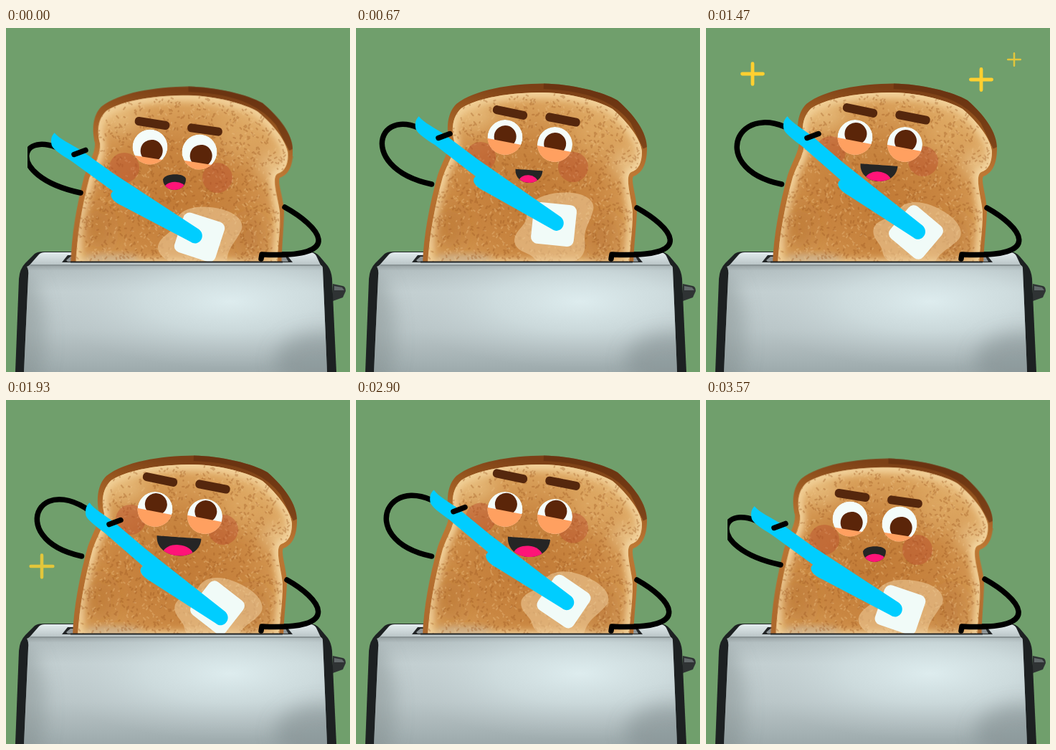
Write an HTML page that moves like this. It is 480 px wide and 480 px high and loops after 3610 ms.

```html
<!DOCTYPE html>
<html lang="en">
<head>
<meta charset="utf-8">
<title>Buttering toast</title>
<style>
html, body { margin: 0; width: 100%; height: 100%; overflow: hidden; background: #709f6c; }
svg { display: block; width: 100vw; height: 100vh; }
.limb { fill: none; stroke: #000; stroke-width: 7.5; stroke-linecap: round; stroke-linejoin: round; }
</style>
</head>
<body>
<svg viewBox="0 0 480 480" xmlns="http://www.w3.org/2000/svg">
  <defs>
    <linearGradient id="crust" x1="0.35" y1="0" x2="0.2" y2="1">
      <stop offset="0" stop-color="#7c4016"/><stop offset=".14" stop-color="#97561f"/>
      <stop offset=".4" stop-color="#bd7834"/><stop offset="1" stop-color="#ac682c"/>
    </linearGradient>
    <radialGradient id="crumb" cx=".47" cy=".6" r=".62">
      <stop offset="0" stop-color="#c17a36"/><stop offset=".5" stop-color="#c98641"/>
      <stop offset=".85" stop-color="#d9a05a"/><stop offset="1" stop-color="#e6b877"/>
    </radialGradient>
    <linearGradient id="steel" x1="0" y1="0" x2="0" y2="1">
      <stop offset="0" stop-color="#98a2a4"/><stop offset=".05" stop-color="#b4c0c2"/>
      <stop offset=".25" stop-color="#c3cfd1"/><stop offset=".6" stop-color="#bac6c8"/>
      <stop offset="1" stop-color="#9daaac"/>
    </linearGradient>
    <radialGradient id="shine" cx=".68" cy=".32" r=".62" gradientTransform="translate(0 .02)">
      <stop offset="0" stop-color="#dfeef0" stop-opacity=".95"/><stop offset=".45" stop-color="#d6e5e7" stop-opacity=".6"/>
      <stop offset="1" stop-color="#c0cccf" stop-opacity="0"/>
    </radialGradient>
    <linearGradient id="lid" x1="0" y1="0" x2="0" y2="1">
      <stop offset="0" stop-color="#e3ecee"/><stop offset="1" stop-color="#b4bfc1"/>
    </linearGradient>
    <filter id="soft" x="-30%" y="-30%" width="160%" height="160%"><feGaussianBlur stdDeviation="5"/></filter>
    <filter id="softer" x="-60%" y="-60%" width="220%" height="220%"><feGaussianBlur stdDeviation="13"/></filter>
    <clipPath id="above"><rect width="480" height="326"/></clipPath>
    <clipPath id="armBox"><rect x="30" width="450" height="480"/></clipPath>
    <clipPath id="eyeBall"><circle r="24.5"/></clipPath>
    <path id="loaf" d="M93 330C94 290 103 245 114 205C121 185 130 172 130 158C126 140 127 119 140 106C165 86 215 78 262 77.500C300 78 345 89 365 101C388 121 406 145 406 168C406 192 398 203 387 207C383 212 392 238 392 255C391 280 388 300 387 330Z"/>
    <path id="slice" d="M100 330C102 290 110 248 121 208C127 190 138 175 137 158C133 142 134 124 147 112C170 97 215 90 262 90C300 91 340 102 358 113C380 132 397 155 399 172C399 188 394 198 384 201C374 206 385 240 386 256C386 285 382 305 381 330Z"/>
    <path id="panel" d="M33 331H438Q442 331 442 336L448 480H25L31 346Q32 337 29 333Z"/>
    <clipPath id="inLoaf"><use href="#loaf"/></clipPath>
    <clipPath id="inSlice"><use href="#slice"/></clipPath>
    <clipPath id="inPanel"><use href="#panel"/></clipPath>
    <clipPath id="inMouth"><path id="mouthClip"/></clipPath>
  </defs>

  <rect width="480" height="480" fill="#709f6c"/>

  <g id="toaster">
    <path d="M456 357L470 360Q474 361 474 367L470 376L456 381Z" fill="#2f3334"/>
    <path d="M458 360L469 362L472 366H458Z" fill="#62696b"/>
    <path d="M13 480L18 350Q19 336 27 328L40 315Q44 312 52 312H424Q432 312 438 319L449 332Q454 339 455 350L461 480Z" fill="#1d2122"/>
    <path d="M31 333L45 317Q48 313 54 313H424Q430 313 433 318L440 333Z" fill="url(#lid)"/>
    <use href="#panel" fill="url(#steel)"/>
    <use href="#panel" fill="url(#shine)"/>
    <g clip-path="url(#inPanel)" filter="url(#softer)">
      <ellipse cx="24" cy="430" rx="30" ry="90" fill="#7e898b" opacity=".45"/>
      <ellipse cx="440" cy="465" rx="65" ry="40" fill="#7e898b" opacity=".5"/>
    </g>
    <path d="M34 331H438" stroke="#8a9496" stroke-width="2"/>
    <path d="M78 327L86 317H392L400 327Z" fill="#232627"/>
    <path d="M84 324L90 319H96V326H86Z" fill="#8d9496"/>
    <path d="M384 319H390L394 326H384Z" fill="#8d9496"/>
  </g>

  <g clip-path="url(#above)">
    <g id="toast">
      <use href="#loaf" fill="url(#crust)"/>
      <path clip-path="url(#inLoaf)" d="M262 77C340 80 372 104 390 128L408 165" fill="none" stroke="#5d2a0d" stroke-width="16" opacity=".55"/>
      <use href="#slice" fill="url(#crumb)"/>
      <g clip-path="url(#inSlice)">
        <use href="#slice" fill="none" stroke="#f3d39c" stroke-width="14" filter="url(#soft)"/>
        <g filter="url(#softer)">
          <ellipse cx="165" cy="122" rx="28" ry="18" fill="#efcb90" opacity=".6"/>
          <ellipse cx="330" cy="150" rx="30" ry="30" fill="#e4b16c" opacity=".5"/>
          <ellipse cx="378" cy="190" rx="16" ry="14" fill="#f6dba8" opacity=".9"/>
          <ellipse cx="130" cy="280" rx="18" ry="35" fill="#b0682a" opacity=".5"/>
          <ellipse cx="345" cy="295" rx="22" ry="35" fill="#b0682a" opacity=".45"/>
        </g>
        <ellipse cx="150" cy="322" rx="40" ry="7" fill="#c9b294" opacity=".7" filter="url(#soft)"/>
        <path id="dark" fill="none" stroke="#9c5520" stroke-width="2.2" stroke-linecap="round" opacity=".33"/>
        <path id="light" fill="none" stroke="#efc488" stroke-width="2" stroke-linecap="round" opacity=".33"/>
      </g>
    </g>
    <g fill="#b8402c" fill-opacity=".36"><circle id="cheekL" r="21"/><circle id="cheekR" r="21"/></g>
    <path id="spread" fill="#f1cf9f" fill-opacity=".55" d="M-32 -30C-22 -42 0 -48 26 -46C46 -44 58 -34 55 -22C50 -4 42 4 43 20C46 38 38 50 18 51C-4 48 -16 58 -27 46C-34 36 -52 38 -55 22C-55 6 -40 2 -38 -12C-38 -20 -36 -26 -32 -30Z"/>
    <g id="eyes"></g>
    <g fill="#55270d"><rect id="browL" x="-24.5" y="-6" width="49" height="12" rx="5.5"/><rect id="browR" x="-24.5" y="-6" width="49" height="12" rx="5.5"/></g>
    <g id="mouth">
      <path id="lips" fill="#252525"/>
      <ellipse id="tongue" fill="#ff1478" clip-path="url(#inMouth)"/>
    </g>
    <rect id="butter" x="-30" y="-29" width="60" height="58" rx="9" fill="#f1fbf8"/>
  </g>
  <path d="M90 326.500H386" stroke="#202324" stroke-width="2"/>

  <g clip-path="url(#armBox)"><path id="armL" class="limb"/></g>
  <path id="knife" fill="#00cdff" d="M0 -1C12 2 26 -2 46 -3L100 -3.500L242 -10.500C257 -10 257 10.500 243 10.500L136 26C121 29 112 25 114 17L42 17C26 18.500 14 19 8 16C2 11 -1 6 0 -1Z"/>
  <path id="grip" class="limb" d="M-8 3L8 -3"/>
  <path id="armR" class="limb"/>
  <g id="stars" fill="none" stroke="#ffd030" stroke-linecap="round"></g>
</svg>
<script>
const LOOP = 3610;
const $ = id => document.getElementById(id);
const put = (id, x, y, rot = 0) => $(id).setAttribute("transform", `translate(${x} ${y}) rotate(${rot})`);
const set = (el, attrs) => { for (const k in attrs) el.setAttribute(k, attrs[k]); };

// Smooth periodic curve through the given values, without overshoot
function track(times, values) {
  const n = times.length;
  const at = i => times[(i + n) % n] + LOOP * Math.floor(i / n);
  const val = i => values[(i + n) % n];
  const slope = i => (val(i + 1) - val(i)) / (at(i + 1) - at(i));
  const tangent = i => {
    const a = slope(i - 1), b = slope(i);
    return a * b <= 0 ? 0 : 2 * a * b / (a + b);
  };
  return t => {
    let i = n - 1;
    while (times[i] > t) i--;
    const h = at(i + 1) - at(i), p = (t - at(i)) / h, q = 1 - p;
    return val(i) * q * q * (1 + 2 * p) + val(i + 1) * p * p * (3 - 2 * p)
      + h * p * q * (q * tangent(i) - p * tangent(i + 1));
  };
}
function tracks(times, table) {
  const out = {};
  for (const k in table) out[k] = track(times, table[k]);
  return out;
}
function sample(table, t) {
  const out = {};
  for (const k in table) out[k] = table[k](t);
  return out;
}

const tool = tracks([0, 670, 1470, 1930, 2230, 2530, 2880, 3230, 3400, 3570], {
  x: [67, 87, 113, 116, 80, 75, 108, 104, 84, 67],
  y: [147, 124, 124, 144, 154, 132, 126, 149, 158, 149],
  rot: [36, 37.6, 41.2, 41, 37.5, 36.3, 40, 40.2, 38, 36],
  bx: [270, 276, 293, 295, 272, 269, 290, 288, 276, 271],
  by: [292, 274, 285, 290, 296, 287, 281, 291, 299, 293],
  brot: [18, 6, 40, 38, 24, 22, 34, 36, 26, 19],
  ax: [20, 34, 50, 50, 30, 28, 48, 45, 28, 20],
  ay: [130, 91, 85, 82, 110, 110, 86, 87, 125, 131]
});
const face = tracks([0, 670, 1470, 1930, 2530, 3230, 3570], {
  brow: [133, 118, 115, 111, 106, 107, 133],
  cheek: [195, 180, 172, 167, 164, 166, 195],
  lid: [15, 6, 5, 3, 1, 4, 15],
  gaze: [5, -1, -5, -7, -8, -6, 5],
  mouthY: [211, 198, 191, 191.5, 192, 194, 211],
  mouthW: [32, 38, 52, 62, 61, 56, 32],
  mouthD: [15, 18, 23, 26, 27, 25, 15],
  elbow: [480, 482, 478, 475, 473, 482, 480]
});
const lean = track([0, 560, 2800, 3230, 3570], [0, 1, 1, 0.93, 0]);

// Crumb texture
let seed = 7;
const rnd = () => (seed = seed * 16807 % 2147483647) / 2147483647;
function crumbs(n) {
  let d = "";
  while (n--) d += `M${(100 + rnd() * 300).toFixed(1)} ${(92 + rnd() * 236).toFixed(1)}l${(rnd() * 5 - 2.5).toFixed(1)} ${(rnd() * 3).toFixed(1)}`;
  return d;
}
$("dark").setAttribute("d", crumbs(1100));
$("light").setAttribute("d", crumbs(800));

$("eyes").innerHTML = ["L", "R"].map(s =>
  `<g id="eye${s}"><g clip-path="url(#eyeBall)"><circle r="24.500" fill="#f4fcfa"/>` +
  `<circle id="pupil${s}" r="15.500" fill="#5b2509"/>` +
  `<rect id="lid${s}" x="-30" width="60" height="60" fill="#ffa060"/></g></g>`).join("");

const stars = [
  { x: 65, y: 64, r: 19, from: 850, to: 1700 },
  { x: 384, y: 72, r: 19, from: 1000, to: 1650 },
  { x: 430, y: 44, r: 13, from: 1350, to: 1850, thin: 0.55 },
  { x: 50, y: 232, r: 19, from: 1650, to: 2060, thin: 0.9 }
];
for (const s of stars) {
  s.el = document.createElementNS("http://www.w3.org/2000/svg", "path");
  $("stars").append(s.el);
}

function drawFace(t, L) {
  const f = sample(face, t), back = 1 - L;
  const tilt = 9 + 2 * L;
  put("eyeL", 201 + 7 * L, 166 - 13.5 * L, tilt);
  put("eyeR", 270 + 7.5 * L, 173 - 10.5 * L, tilt);
  for (const s of ["L", "R"]) {
    set($("pupil" + s), { cx: 3 * back, cy: f.gaze });
    set($("lid" + s), { y: f.lid });
  }
  const bx = 204 + 11 * L;
  put("browL", bx, f.brow, 9 + 3 * L);
  put("browR", bx + 73.5, f.brow + 9 + L, 8 + 3 * L);
  put("cheekL", 165 + 9 * L, f.cheek);
  put("cheekR", 295 + 8 * L, f.cheek + 14);

  const w = f.mouthW / 2, d = f.mouthD, bulge = 9 * back;
  const shape = `M${-w} 0C${-w * 0.9} ${-bulge} ${w * 0.9} ${-bulge} ${w} 0C${w} ${d * 1.33} ${-w} ${d * 1.33} ${-w} 0Z`;
  $("lips").setAttribute("d", shape);
  $("mouthClip").setAttribute("d", shape);
  set($("tongue"), { cx: 0, cy: d * 0.95, rx: w * (0.7 + 0.3 * back), ry: d * (0.54 + 0.16 * back) });
  put("mouth", 235 + 6.5 * L, f.mouthY, -2 + 6 * L);
  return f.elbow;
}

function drawArms(t, L, elbow) {
  const p = sample(tool, t);
  put("knife", p.x, p.y, p.rot);
  put("grip", p.x + 36, p.y + 26.5);
  put("butter", p.bx, p.by, p.brot);
  put("spread", p.bx, p.by + 2, (p.brot - 6) * 0.9);
  const sx = 104 + 1.5 * L, sy = 230 - 12 * L;
  $("armL").setAttribute("d", `M${sx} ${sy}C${sx - 112} ${sy - 24} ${p.ax} ${p.ay} ${p.x + 24} ${p.y + 31}`);
  const rx = 389 + 3 * L, ry = 250 + L;
  $("armR").setAttribute("d", `M${rx} ${ry}C${rx + 45} ${ry + 25} ${elbow} 322 357 316L356 322`);
}

function drawStars(t) {
  for (const s of stars) {
    const p = (t - s.from) / (s.to - s.from);
    const env = p > 0 && p < 1 ? Math.sqrt(Math.sin(Math.PI * p)) : 0;
    const r = Math.max(0, s.r * env - 2);
    set(s.el, {
      d: `M${s.x - r} ${s.y}H${s.x + r}M${s.x} ${s.y - r}V${s.y + r}`,
      "stroke-width": 5.5 * env * (s.thin || 1),
      opacity: env ? (s.thin ? 0.8 : 1) : 0
    });
  }
}

function draw(t) {
  const L = lean(t), back = 1 - L;
  const shear = 0.02 * back, sy = 1 - 0.017 * back;
  $("toast").setAttribute("transform",
    `matrix(1 0 ${shear} ${sy} ${-326 * shear - 2.5 * back} ${326 * (1 - sy)})`);
  drawArms(t, L, drawFace(t, L));
  drawStars(t);
}

const start = performance.now();
function tick() {
  draw((performance.now() - start) % LOOP);
  requestAnimationFrame(tick);
}
tick();
</script>
</body>
</html>
```
